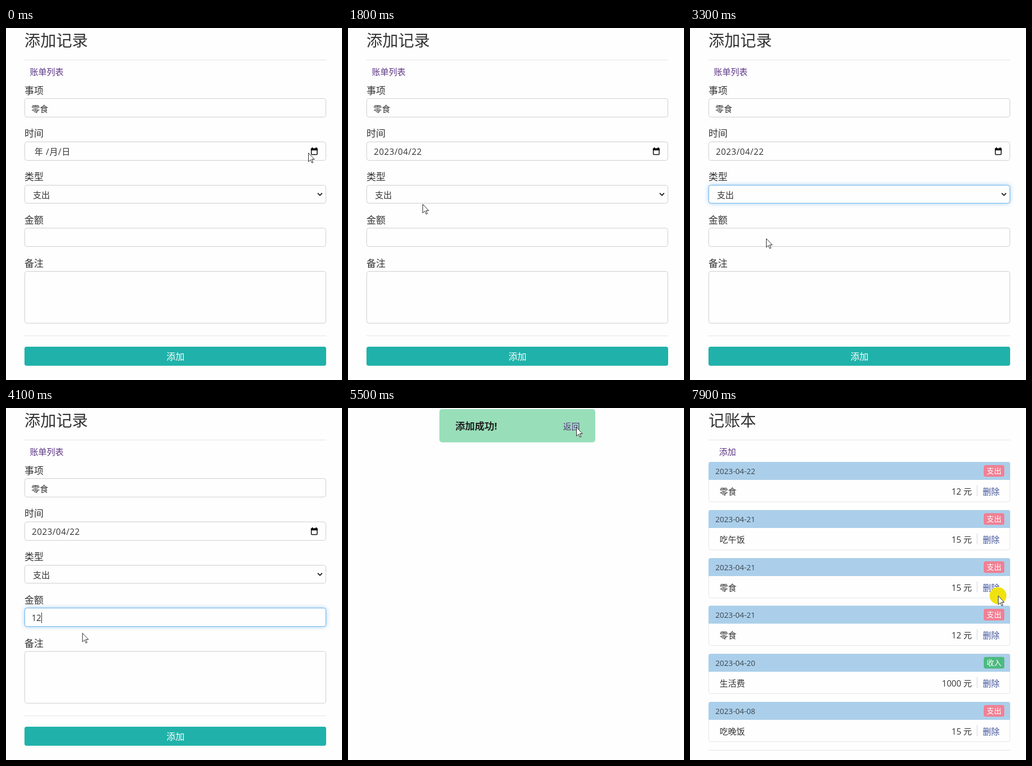
An HTML page that plays this animation: 636 px wide and 666 px high, repeating every 8 s.

```html
<!DOCTYPE html>
<html lang="zh-CN">
<head>
<meta charset="utf-8">
<title>记账本</title>
<style>
html, body { margin: 0; width: 100%; height: 100%; overflow: hidden; background: #fefefe; }
svg { display: block; width: 636px; height: 666px; }
text { font-family: "Open Sans", "Noto Sans CJK SC", "Noto Sans CJK", sans-serif; fill: #333; }
.field { fill: #fefefe; stroke: #ccc; }
.card { fill: #fefefe; stroke: #e3e4e8; }
.ring { fill: #fefefe; stroke: #66afe9; filter: drop-shadow(0 0 4px rgba(102, 175, 233, .6)); }
.rule { stroke: #e2e2e2; }
.timed { animation: 8s step-end infinite; }
#pointer { animation: move 8s linear infinite; }

@keyframes form { 0% { opacity: 1 } 62.5%, 100% { opacity: 0 } }
@keyframes done { 0% { opacity: 0 } 62.5% { opacity: 1 } 77.5%, 100% { opacity: 0 } }
@keyframes list { 0% { opacity: 0 } 77.5%, 100% { opacity: 1 } }
@keyframes empty { 0% { opacity: 1 } 17.5%, 100% { opacity: 0 } }
@keyframes filled { 0% { opacity: 0 } 17.5%, 100% { opacity: 1 } }
@keyframes calendar { 0% { opacity: 0 } 5% { opacity: 1 } 17.5%, 100% { opacity: 0 } }
@keyframes select { 0% { opacity: 0 } 27.5% { opacity: 1 } 43.75%, 100% { opacity: 0 } }
@keyframes menu { 0% { opacity: 0 } 28.75% { opacity: 1 } 37.5%, 100% { opacity: 0 } }
@keyframes amount { 0% { opacity: 0 } 43.75% { opacity: 1 } 61.25%, 100% { opacity: 0 } }
@keyframes one { 0% { opacity: 0 } 46.25%, 100% { opacity: 1 } }
@keyframes two { 0% { opacity: 0 } 47.5%, 100% { opacity: 1 } }
@keyframes caret {
  0% { opacity: 0; transform: none }
  43.75% { opacity: 1; transform: none }
  46.25% { opacity: 1; transform: translateX(9px) }
  47.5% { opacity: 1; transform: translateX(18px) }
  55%, 100% { opacity: 0; transform: translateX(18px) }
}
@keyframes press { 0% { opacity: 0 } 58.75% { opacity: 1 } 62.5%, 100% { opacity: 0 } }
@keyframes click {
  0%, 5%, 17.5%, 28.75%, 36.25%, 43.75%, 66.25%, 77.5% { opacity: 0 }
  2.5%, 16.25%, 27.5%, 33.75%, 42.5%, 58.75%, 73.75%, 97.5%, 100% { opacity: 1 }
}
@keyframes move {
  0%, 1% { transform: translate(572px, 236px) }
  2.5%, 5% { transform: translate(592px, 249px) }
  15%, 17.5% { transform: translate(201px, 419px) }
  22.5% { transform: translate(141px, 333px) }
  26.25%, 28.75% { transform: translate(128px, 318px) }
  33.75%, 36.25% { transform: translate(123px, 359px) }
  37.5% { transform: translate(123px, 357px) }
  41.25%, 50% { transform: translate(144px, 398px) }
  51.25% { transform: translate(144px, 425px) }
  57.5%, 65% { transform: translate(242px, 627px) }
  66.25% { transform: translate(330px, 400px) }
  67.5% { transform: translate(460px, 90px) }
  68.75% { transform: translate(432px, 36px) }
  72.5%, 76.25% { transform: translate(432px, 41px) }
  77.5%, 78.75% { transform: translate(430px, 30px) }
  87.5% { transform: translate(558px, 162px) }
  97.5%, 100% { transform: translate(583px, 355px) }
}
</style>
</head>
<body>
<svg id="stage" viewBox="0 0 636 666"></svg>
<script>
// y is the vertical centre of the glyphs
const text = (x, y, str, size = 16, attrs = '') =>
  `<text x="${x}" y="${y + size * .375}" font-size="${size}" ${attrs}>${str}</text>`;
const rect = (x, y, w, h, attrs) => `<rect x="${x}" y="${y}" width="${w}" height="${h}" ${attrs}/>`;
const box = (y, h, cls = 'field') => rect(35.5, y + .5, 570, h - 1, `rx="4" class="${cls}"`);
const rule = y => `<path class="rule" d="M35 ${y + .5}H606"/>`;
const timed = (name, body) => `<g class="timed" style="animation-name:${name}">${body}</g>`;
const ink = color => `style="fill:${color}"`;
const middle = color => `text-anchor="middle" ${ink(color)}`;
const visited = ink('#5c3585');

function calendar() {
  const column = i => 57 + i * 28;
  const week = [...'一二三四五六日'].map((d, i) => text(column(i), 306, d, 13, middle('#333')));
  const days = Array.from({ length: 42 }, (_, i) => {
    const date = new Date(2023, 2, 27 + i);
    const color = date.getMonth() === 3 ? '#333' : '#999';
    return text(column(i % 7), 334 + Math.floor(i / 7) * 28, date.getDate(), 13, middle(color));
  });
  return rect(35.5, 252.5, 215, 274, 'rx="3" fill="#fefefe" stroke="#bbb"') +
    text(47, 273, '2023年04月', 14) +
    '<path d="M134 271h8l-4 5z" fill="#333"/>' +
    '<path d="M205 279v-11m-4 4l4-4l4 4M231 267v11m-4-4l4 4l4-4" fill="none" stroke="#333" stroke-width="1.5"/>' +
    rect(185, 405.5, 25, 25, 'rx="2" fill="none" stroke="#1e78e0"') +
    week.join('') + days.join('') +
    text(47, 507, '清除', 13, ink('#1e78e0')) +
    text(212, 507, '今天', 13, ink('#1e78e0'));
}

function form() {
  const labels = ['事项', '时间', '类型', '金额', '备注'];
  return text(35, 22.5, '添加记录', 30, 'font-weight="300"') + rule(60) +
    text(45, 83, '账单列表', 16, visited) +
    labels.map((label, i) => text(35, 118 + i * 81.7, label, 18)).join('') +
    box(133, 36) + text(48, 153, '零食') +
    box(215, 36) +
    timed('empty', text(54, 234, '年 /月/日', 16, 'letter-spacing=".7"')) +
    timed('filled', text(49, 233.5, '2023/04/22', 16, 'letter-spacing=".6"')) +
    rect(578, 229, 11, 10.5, 'rx="1" fill="none" stroke="#000" stroke-width="1.5"') +
    '<path d="M577 227.5h13v4h-13zM579 226h2v3h-2zM586 226h2v3h-2z"/>' +
    box(297, 35) + timed('select', box(297, 35, 'ring')) + text(51, 315.5, '支出') +
    '<path d="M590 312.5l4.2 4.2l4.2-4.2" fill="none" stroke="#222" stroke-width="2"/>' +
    box(378, 36) + timed('amount', box(378, 36, 'ring')) +
    timed('one', text(48.5, 397, '1')) + timed('two', text(57.6, 397, '2')) +
    timed('caret', rect(49, 387, 1, 20, 'fill="#222"')) +
    box(460, 99) + rule(582) +
    rect(35, 603, 571, 36, 'rx="4" fill="#20b2aa"') +
    timed('press', rect(36, 603, 570, 36, 'rx="4" fill="#1ca39c"')) +
    text(320.7, 621.5, '添加', 17, middle('#fff')) +
    timed('menu',
      rect(36, 332, 572, 46, 'fill="#fefefe"') +
      '<path d="M36.5 378V332.5H607.5V378" fill="none" stroke="#666"/>' +
      rect(37, 333, 570, 22, 'fill="#1e90ff"') +
      text(52, 345, '支出', 16, ink('#fff')) + text(52, 367, '收入')) +
    timed('calendar', calendar());
}

function done() {
  return rect(173, 2, 295, 63, 'rx="5" fill="#98dfb9"') +
    text(203, 34, '添加成功!', 18.5, `font-weight="700" ${ink('#222')}`) +
    text(407, 35, '返回', 16, visited);
}

function card([date, kind, item, sum], i) {
  const y = Math.round(102 + i * 90.8);
  const color = kind === '收入' ? '#4dba80' : '#f08094';
  return box(y, 76, 'card') +
    `<path d="M35 ${y + 34}v-30q0-4 4-4h563q4 0 4 4v30z" fill="#abcfea"/>` +
    text(48, y + 17.5, date, 14.5, ink('#3c4650')) +
    rect(556, y + 6, 39, 22, `rx="4" fill="${color}"`) +
    text(575.5, y + 17, kind, 14, middle('#fff')) +
    text(56, y + 56, item) +
    text(533.5, y + 55.5, `${sum} 元`, 16, 'text-anchor="end"') +
    `<path d="M543.5 ${y + 44}v21" stroke="#d4d4dc"/>` +
    text(554, y + 55.5, '删除', 16, ink('#3f549c'));
}

function list() {
  const rows = [
    ['2023-04-22', '支出', '零食', 12],
    ['2023-04-21', '支出', '吃午饭', 15],
    ['2023-04-21', '支出', '零食', 15],
    ['2023-04-21', '支出', '零食', 12],
    ['2023-04-20', '收入', '生活费', 1000],
    ['2023-04-08', '支出', '吃晚饭', 15],
  ];
  return text(35, 22.5, '记账本', 30, 'font-weight="300"') + rule(60) +
    text(55, 83, '添加', 16, visited) +
    rows.map(card).join('') + rule(647);
}

const pointer = `<g id="pointer">
  ${timed('click', '<circle r="16" fill="#f0e210"/>')}
  <path d="M.5 .5V17L4.3 13.4L7 19.3L9.3 18.3L6.7 12.5H11.8Z" fill="#fff" stroke="#222"/>
</g>`;

document.getElementById('stage').innerHTML =
  timed('form', form()) + timed('done', done()) + timed('list', list()) + pointer;
</script>
</body>
</html>
```
